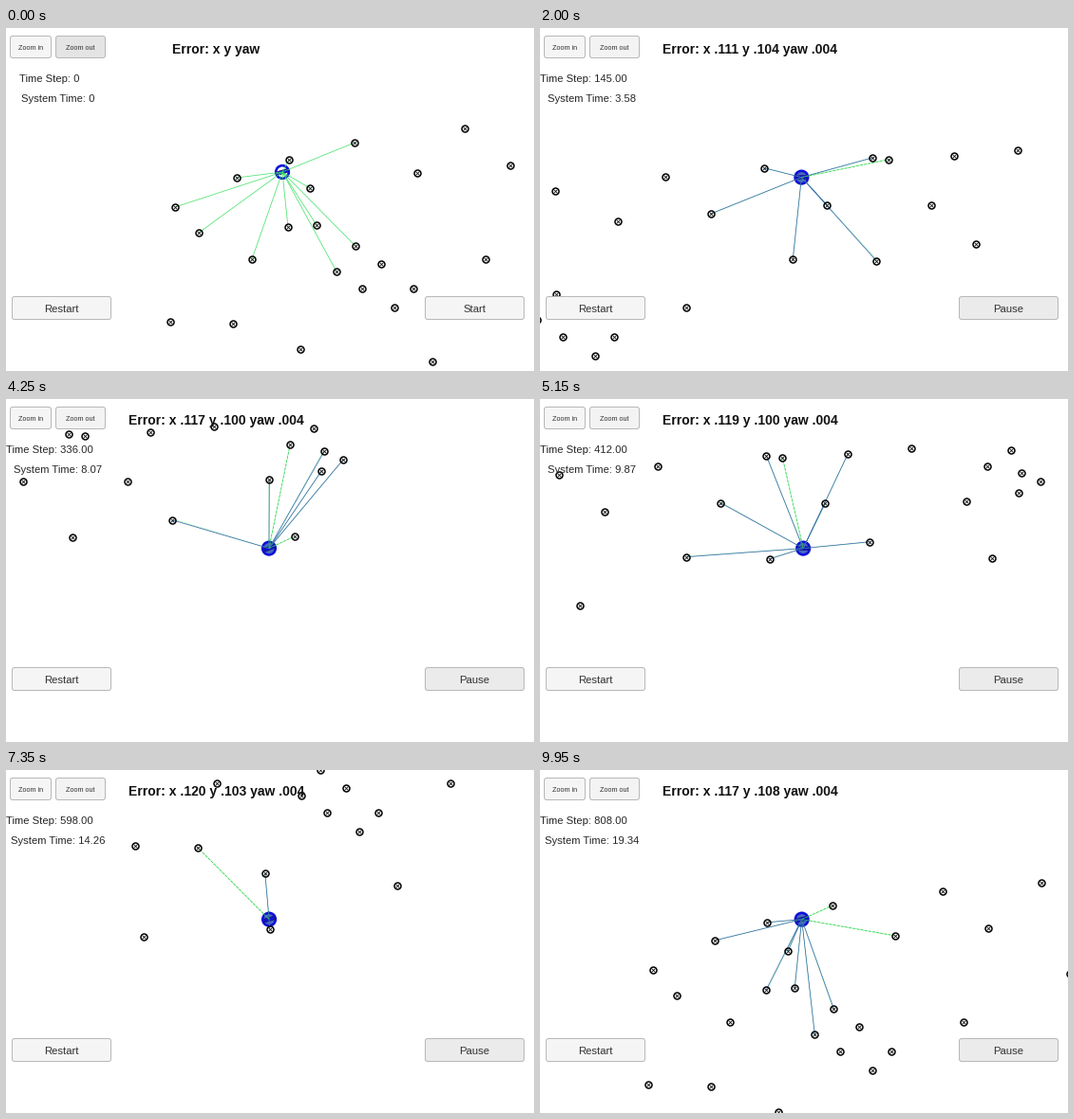
These frames come from a looping animation (556x362 px, 10000 ms). A matplotlib script:

```python
import numpy as np
import matplotlib as mpl
import matplotlib.pyplot as plt
from matplotlib.animation import FuncAnimation
from matplotlib.collections import LineCollection
from matplotlib.patches import Circle, FancyBboxPatch, Polygon

W, H, DPI = 556, 362, 72
FRAMES, STEP_MS = 200, 50
CENTRE = np.array([276.3, 157.6])   # where the camera keeps the car
SENSOR_RANGE = 125
GREEN, BLUE, CAR_BLUE = "#3be062", "#3568ac", "#1010d8"
mpl.rcParams["font.family"] = "Liberation Sans"

# world map; the first of each row of six is seen with a dashed green ray
LANDMARKS = np.array([
    (367, 121), (298, 139), (483, 106), (531, 145), (243, 158), (320, 169),
    (203, 216), (178, 189), (297, 210), (327, 208), (368, 230), (259, 244),
    (239, 312), (348, 257), (395, 249), (375, 275), (429, 275), (409, 295),
    (433, 153), (505, 244), (173, 310), (310, 339), (449, 352), (587, 97),
    (718, 88), (617, 193), (653, 136), (701, 86), (705, 195), (763, 136),
    (934, 97), (787, 84), (854, 78), (810, 177), (912, 134), (970, 104),
    (939, 194), (959, 80), (990, 113), (967, 125), (315, 398), (182, 406),
], float)
DASHED = np.arange(len(LANDMARKS)) % 6 == 0

# key points of the drive: time in s, world x, world y
ROUTE = np.array([
    (0, 291, 152), (1, 420, 114), (2, 627, 106.8), (3.15, 920, 86),
    (3.68, 991, 146), (4.25, 911, 206.8), (5.25, 717, 184.5),
    (6.05, 521, 229.8), (7.35, 313.5, 387.8), (7.9, 205, 401),
    (8.4, 177, 313), (8.8, 185.5, 240.3), (9.3, 230, 165), (9.95, 335, 135.8),
])
TIMES, POINTS = ROUTE[:, 0], ROUTE[:, 1:]
SLOPES = np.gradient(POINTS, TIMES, axis=0)


def route_at(t):
    """Cubic Hermite position along the route."""
    i = int(np.clip(np.searchsorted(TIMES, t, "right") - 1, 0, len(TIMES) - 2))
    h = TIMES[i + 1] - TIMES[i]
    u = (t - TIMES[i]) / h
    return ((2 * u**3 - 3 * u**2 + 1) * POINTS[i]
            + (u**3 - 2 * u**2 + u) * h * SLOPES[i]
            + (3 * u**2 - 2 * u**3) * POINTS[i + 1]
            + (u**3 - u**2) * h * SLOPES[i + 1])


def counters(t):
    """Simulator steps and seconds: nearly steady, slower at both ends."""
    keys = (0, 2, 8.8, 9.95)
    return (round(np.interp(t, keys, (0, 145, 721, 808))),
            np.interp(t, keys, (0, 3.58, 17.16, 19.34)))


def errors(t):
    err_x = np.interp(t, (0, 2, 6.05, 9.95), (.104, .111, .121, .117))
    err_y = .104 - .004 * np.cos(2 * np.pi * (t - 4.9) / 11)
    return [f"{e:.3f}".lstrip("0") for e in (err_x, err_y)]


fig = plt.figure(figsize=(W / DPI, H / DPI), dpi=DPI, facecolor="white")
ax = fig.add_axes([0, 0, 1, 1])
ax.set_xlim(0, W)
ax.set_ylim(H, 0)
ax.axis("off")


def label(x, y, text, size, color="#262626", **kw):
    return ax.text(x, y, text, fontsize=size, color=color, ha="center",
                   va="baseline", zorder=12, **kw)


def button(x0, y0, x1, y1, text, size):
    box = FancyBboxPatch((x0 + 2.5, y0 + 2.5), x1 - x0 - 5, y1 - y0 - 5,
                         boxstyle="round,pad=2,rounding_size=2.5",
                         fc="#f5f5f5", ec="#b8b8b8", lw=1, zorder=10)
    ax.add_patch(box)
    caption = label((x0 + x1) / 2, (y0 + y1) / 2 + 0.36 * size, text, size,
                    "#323232")
    return box, caption


button(4, 8, 48, 32, "Zoom in", 7.3)
zoom_out, _ = button(52, 8, 105, 32, "Zoom out", 7.3)
button(6, 283, 111, 308, "Restart", 11.2)
run_box, run_text = button(441, 283, 546, 308, "Start", 11.2)

title = label(221.4, 27, "", 13.9, "#101010", weight="bold")
step_text = label(45.5, 57, "", 11.2)
time_text = label(54.8, 78, "", 11.2)

rings, = ax.plot([], [], "o", ms=7, mfc="none", mec="black", mew=1.5, zorder=6)
crosses, = ax.plot([], [], "x", ms=4, mec="#181818", mew=0.9, zorder=6)

ring = Circle((0, 0), 6.8, ec=CAR_BLUE, lw=2.6, zorder=3)
body = Polygon(np.zeros((4, 2)), closed=True, fc=CAR_BLUE, ec="#101060",
               lw=0.6, zorder=3.5)
ax.add_patch(ring)
ax.add_patch(body)

sensed = LineCollection([], colors=GREEN, linewidths=0.7, zorder=4)
predicted = LineCollection([], colors=BLUE, linewidths=0.75, zorder=4.5)
dashed = LineCollection([], colors="#1fd43a", linewidths=0.7,
                        linestyles=(0, (4, 2)), zorder=5)
for lines in (sensed, predicted, dashed):
    ax.add_collection(lines, autolim=False)


def rays(start, ends):
    return [(start, end) for end in ends]


def draw(n):
    t = n * STEP_MS / 1000
    running = n > 0
    world = route_at(t)
    speed = (route_at(t + 0.01) - route_at(t - 0.01)) / 0.02
    car = CENTRE - (0.004 * speed[0], 0) if running else world
    marks = LANDMARKS + (CENTRE - world) * running

    rings.set_data(*marks.T)
    crosses.set_data(*marks.T)

    # car and its heading
    ahead = speed / np.hypot(*speed)
    side = np.array([-ahead[1], ahead[0]])
    body.set_xy([car + 5.5 * a * ahead + 1.9 * b * side
                 for a, b in ((1, 1), (1, -1), (-1, -1), (-1, 1))])
    ring.center = car
    ring.set_facecolor("#4868c4" if running else "white")

    # sensor rays, slightly noisy while driving
    rng = np.random.default_rng(n)
    noise = rng.normal(0, 0.5, marks.shape) * running
    near = np.hypot(*(marks - car).T) < SENSOR_RANGE
    sensed.set_segments(rays(car, (marks + noise)[near]))
    sensed.set_alpha(0.45 if running else 1)
    predicted.set_segments(rays(car, marks[near & ~DASHED & running]))
    dashed.set_segments(rays(car, marks[near & DASHED & running]))

    zoom_out.set_facecolor("#f3f3f3" if running else "#e4e4e4")
    run_box.set_facecolor("#ebebeb" if running else "#f5f5f5")
    run_text.set_text("Pause" if running else "Start")
    if running:
        steps, seconds = counters(t)
        title.set_text("Error: x {} y {} yaw .004".format(*errors(t)))
        step_text.set_text(f"Time Step: {steps}.00")
        time_text.set_text(f"System Time: {seconds:.2f}")
    else:
        title.set_text("Error: x y yaw")
        step_text.set_text("Time Step: 0")
        time_text.set_text("System Time: 0")
    return []


anim = FuncAnimation(fig, draw, frames=FRAMES, interval=STEP_MS,
                     init_func=lambda: draw(0), repeat=True, repeat_delay=0)
plt.show()
```
